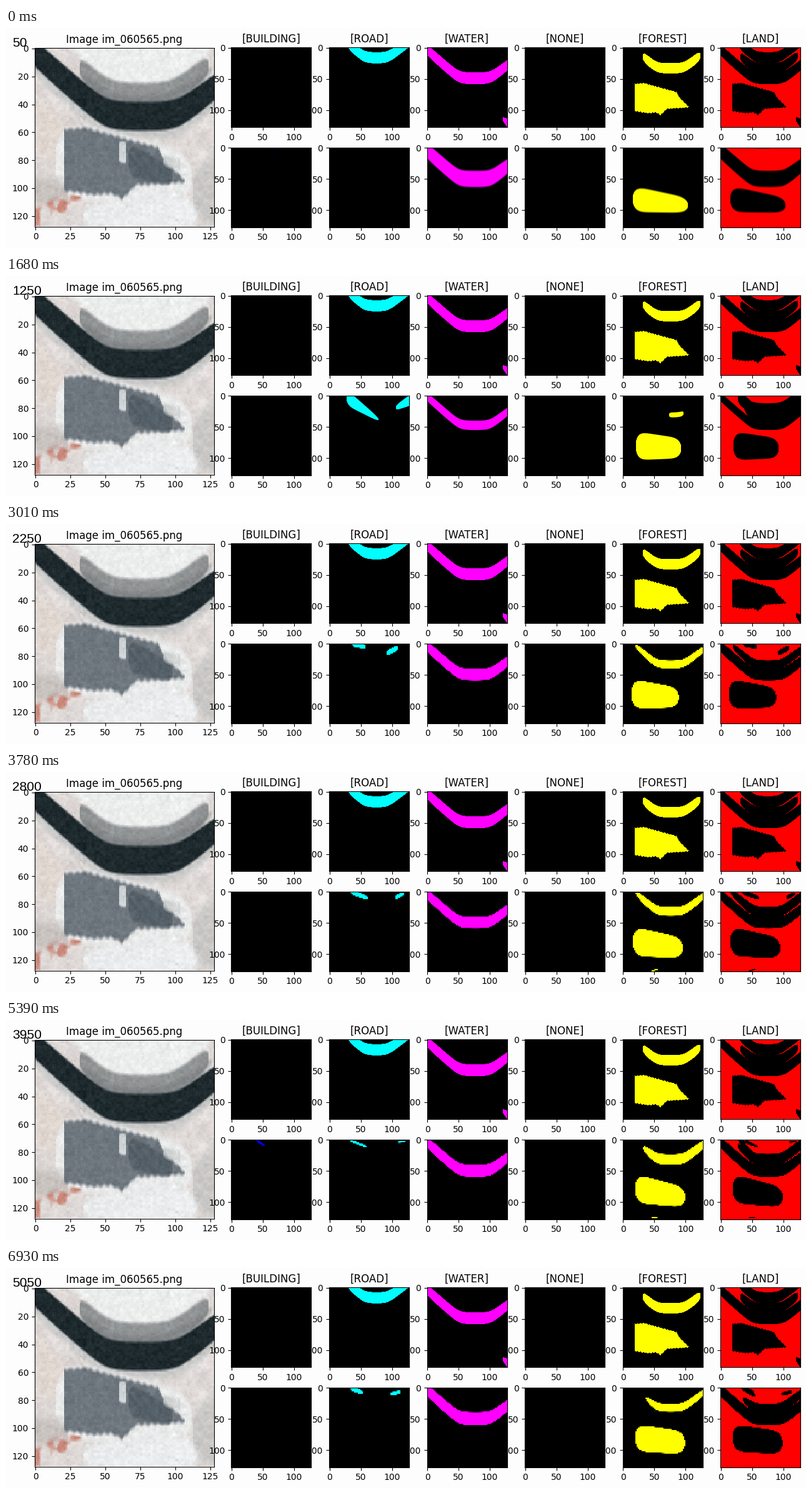
A matplotlib script that plays this animation: 1280x353 px, repeating every 7000 ms.

```python
import numpy as np
import matplotlib.pyplot as plt
from matplotlib.animation import FuncAnimation

W, H, DPI, SIZE = 1280, 353, 100, 128
FRAMES, STEP_MS = 100, 70

NAMES = ["BUILDING", "ROAD", "WATER", "NONE", "FOREST", "LAND"]
COLORS = np.array([(0, 0, 1), (0, 1, 1), (1, 0, 1), (1, 1, 1), (1, 1, 0), (1, 0, 0)], float)
PIXELS = np.arange(SIZE, dtype=float)


# ---- shapes: each gives a middle line and a half height along x ----
def cap(x, x0, x1, blunt=6):
    """Rounded ends: 1 inside x0..x1, falling to 0 at both ends."""
    u = 2 * (x - x0) / (x1 - x0) - 1
    return np.sqrt(np.clip(1 - np.abs(u) ** blunt, 0, 1))


def valley(x, floor):
    """The river bend: a flat floor between two soft corners."""
    ramp = lambda d: (d + np.hypot(d, 9)) / 2
    left, right = 60 - 0.16 * floor, 88 + 0.22 * floor
    return floor + 1 - 0.9 * ramp(left - x) - 0.8 * ramp(x - right)


def band(x, x0, x1, floor, thick, blunt=6):
    return valley(x, floor) - thick / 2, thick / 2 * cap(x, x0, x1, blunt)


def lens(x, x0, x1, y0, y1, h0, h1):
    u = (x - x0) / (x1 - x0)
    return y0 + (y1 - y0) * u, (h0 + (h1 - h0) * u) / 2 * cap(x, x0, x1)


def grove(x):
    """The forest patch, from a few corner points."""
    top = np.interp(x, [19, 34, 62, 85, 90, 105], [58, 57, 65, 71, 80, 95])
    bot = np.interp(x, [19, 40, 52, 60, 70, 105], [102, 105, 104, 108, 98, 96])
    ripple = 0.6 * np.sin(1.3 * x)
    return (top + bot) / 2 + ripple, (bot - top) / 2 * ((x > 18.5) & (x < 105))


def cover(mid, half, y=PIXELS, soft=0.2):
    a = np.clip((half - np.abs(y[:, None] - mid)) / soft + 0.5, 0, 1)
    return a * (half > 0)


def union(*masks):
    return np.max(masks, axis=0)


def paint(house, road, water, wood, gap=0):
    """One RGB image per class; land is whatever is left."""
    none = np.zeros((SIZE, SIZE))
    land = 1 - union(house, road, water, wood, gap + none)
    return [m[..., None] * c for m, c in zip((house, road, water, none, wood, land), COLORS)]


# ---- labelled masks ----
RIVER = band(PIXELS, -20, 147, 59, 19)
ROAD = band(PIXELS, 28, 150, 26, 18, 16)
REEDS = band(PIXELS, 31, 124, 42, 16.5, 16)
GROVE = grove(PIXELS)
POND = lens(PIXELS, 120, 129, 114, 122, 6, 16)


def truth():
    hard = lambda *parts: union(*(cover(*p) for p in parts)).round()
    return paint(np.zeros((SIZE, SIZE)), hard(ROAD), hard(RIVER, POND), hard(REEDS, GROVE))


# ---- aerial picture ----
def aerial():
    rng = np.random.default_rng(7)

    def mottle(cell):
        n = SIZE // cell
        field = np.kron(rng.normal(0, 1, (n, n)), np.ones((cell, cell)))
        for axis in (0, 1):
            field = sum(np.roll(field, s, axis) for s in range(cell)) / cell
        return field

    x = PIXELS
    img = (np.array((224, 219, 216)) + 6 * mottle(8)[..., None]) * np.ones((SIZE, SIZE, 1))
    patches = mottle(4)
    layers = [
        (band(x, 5, 140, 28, 34), (236, 237, 237), 5, 1),
        (lens(x, -5, 36, 52, 76, 46, 18), (226, 215, 208), 8, 0.8),
        (band(x, -20, 147, 65, 25), (200, 201, 200), 5, 1),
        (lens(x, 14, 112, 80, 92, 58, 36), (233, 234, 234), 5, 1),
        (lens(x, 34, 116, 120, 118, 20, 26), (234, 236, 237), 8, 1),
        (lens(x, -4, 24, 102, 104, 24, 14), (182, 177, 173), 8, 0.6),
        (lens(x, 112, 134, 104, 100, 30, 60), (192, 193, 193), 8, 0.6),
        (REEDS, (146, 149, 150), 3, 1),
        (band(x, 31, 126, 42, 8), (116, 121, 123), 5, 0.5),
        (band(x, -20, 147, 59.5, 20.5), (31, 42, 47), 2, 1),
        (grove(x - 2), (110, 119, 126), 3, 1),
        (lens(x, 66, 98, 80, 92, 24, 14), (86, 96, 104), 3, 1),
        (lens(x, 59, 65, 74, 75, 14, 16), (208, 213, 215), 2, 1),
        (lens(x, 91, 104, 80, 84, 8, 8), (204, 207, 208), 3, 0.8),
    ]
    for part, color, soft, k in layers:
        a = k * cover(*part, soft=soft)[..., None]
        img = img * (1 - a) + np.array(color) * a
    # reddish soil in broken patches
    a = cover(*lens(x, -6, 34, 124, 105, 16, 10), soft=4) * np.clip(0.55 + 1.2 * patches, 0, 0.9)
    img += a[..., None] * (np.array((200, 128, 114)) - img)
    img += 5 * mottle(2)[..., None] + rng.normal(0, 2.5, (SIZE, SIZE, 1))
    return np.clip(img, 0, 255) / 255


# ---- predicted masks: poses at KEYS; a part without a pose has shrunk away ----
KEYS = [0, 14, 24, 43, 66, 88, 99]


def river_pose(floor, thick):
    return -20, 147, floor, thick


WATER = (band, {0: river_pose(63, 26), 14: river_pose(58, 17), 24: river_pose(55, 15),
                43: river_pose(59, 19), 66: river_pose(59, 19), 88: river_pose(60, 19),
                99: river_pose(60, 21)})
WOOD = (lens, {0: (15, 104, 82, 92, 42, 24), 14: (17, 94, 80, 89, 48, 34),
               24: (20, 93, 80, 84, 46, 32), 43: (13, 89, 80, 86, 48, 32),
               66: (18, 103, 79, 94, 50, 32), 88: (20, 96, 80, 92, 42, 34),
               99: (19, 99, 80, 88, 44, 37)})
STRIP = (band, {24: (73, 97, 35, 8), 43: (19, 135, 40, 13), 66: (22, 135, 40, 15),
                88: (42, 132, 41, 18), 99: (36, 132, 39, 13)})
SPECK = (lens, {66: (46, 55, 126, 125, 4, 4)})
ROAD_LEFT = (lens, {24: (27, 79, 2, 38, 26, 6), 43: (36, 58, 0, 4, 9, 8),
                    66: (31, 65, 0, 14, 9, 6), 99: (34, 54, 0, 8, 9, 7)})
ROAD_RIGHT = (lens, {14: (123, 128, 22, 22, 10, 10), 24: (106, 134, 19, 4, 8, 20),
                     43: (91, 110, 15, 6, 9, 9), 66: (121, 129, 0, 0, 4, 4),
                     99: (98, 114, 10, 6, 6, 6)})
HOUSE = (lens, {0: (55, 78, 0, 0, 1, 1), 88: (40, 54, 0, 10, 9, 6)})
# Areas given to no class: only land leaves them out.
GAP = (band, {24: (36, 150, 45, 33), 43: (19, 150, 42, 14), 66: (12, 150, 42, 20),
              88: (42, 150, 42, 17), 99: (36, 150, 42, 14)})
BRANCH = (lens, {88: (28, 53, 0, 22, 14, 10), 99: (38, 55, 0, 12, 12, 8)})


def pose(part, n, rng, x):
    """Blend the two nearest keys; a seeded wobble stands for training noise."""
    kind, poses = part
    i = min(np.searchsorted(KEYS, n, "right") - 1, len(KEYS) - 2)
    a, b = KEYS[i], KEYS[i + 1]
    u = (n - a) / (b - a)
    p, q = (np.array(poses[min(poses, key=lambda k: abs(k - key))], float) for key in (a, b))
    grow = (a in poses) * (1 - u) + (b in poses) * u
    values = p * (1 - u) + q * u
    values[2:] += np.sin(np.pi * u) * rng.normal(0, 0.8, len(values) - 2)
    mid, half = kind(x, *values)
    return mid, half * grow


def predict(n):
    rng = np.random.default_rng(n)
    soft = np.interp(n, [0, 14, 24, 43], [3, 1.4, 1, 0.5])
    block = 1 if n < 36 else 2
    g = PIXELS // block * block + (block - 1) / 2

    def mask(*parts):
        return union(*(cover(*pose(p, n, rng, g), g, soft) for p in parts))

    return paint(mask(HOUSE), mask(ROAD_LEFT, ROAD_RIGHT), mask(WATER),
                 mask(WOOD, STRIP, SPECK), mask(GAP, BRANCH))


# ---- figure ----
fig = plt.figure(figsize=(W / DPI, H / DPI), dpi=DPI, facecolor="#fdfdfd")


def panel(x, y, size, img, xticks, yticks, title=""):
    ax = fig.add_axes([x / W, 1 - (y + size) / H, size / W, size / H])
    im = ax.imshow(img, interpolation="nearest", aspect="auto")
    ax.set_xticks(xticks)
    ax.set_yticks(yticks)
    ax.set_title(title, fontsize=12)
    return im


panel(46, 31.8, 286.7, aerial(), range(0, 126, 25), range(0, 121, 20), "Image im_060565.png")
ticks = (0, 50, 100)
outputs = []
for i, (name, label, guess) in enumerate(zip(NAMES, truth(), predict(0))):
    x = 360.4 + 156.6 * i
    panel(x, 31.3, SIZE, label, ticks, ticks, f"[{name}]")
    outputs.append(panel(x, 191.7, SIZE, guess, ticks, ticks))

counter = fig.text(10 / W, 1 - 30 / H, "", family="Liberation Sans", fontsize=21 * 72 / DPI)


def draw(n):
    # one checkpoint is missing from the run
    counter.set_text(str(50 * (n + 1 + (n >= 34))))
    for im, img in zip(outputs, predict(n)):
        im.set_data(img)
    return [counter, *outputs]


anim = FuncAnimation(fig, draw, frames=FRAMES, interval=STEP_MS, repeat=True, repeat_delay=0)
plt.show()
```
